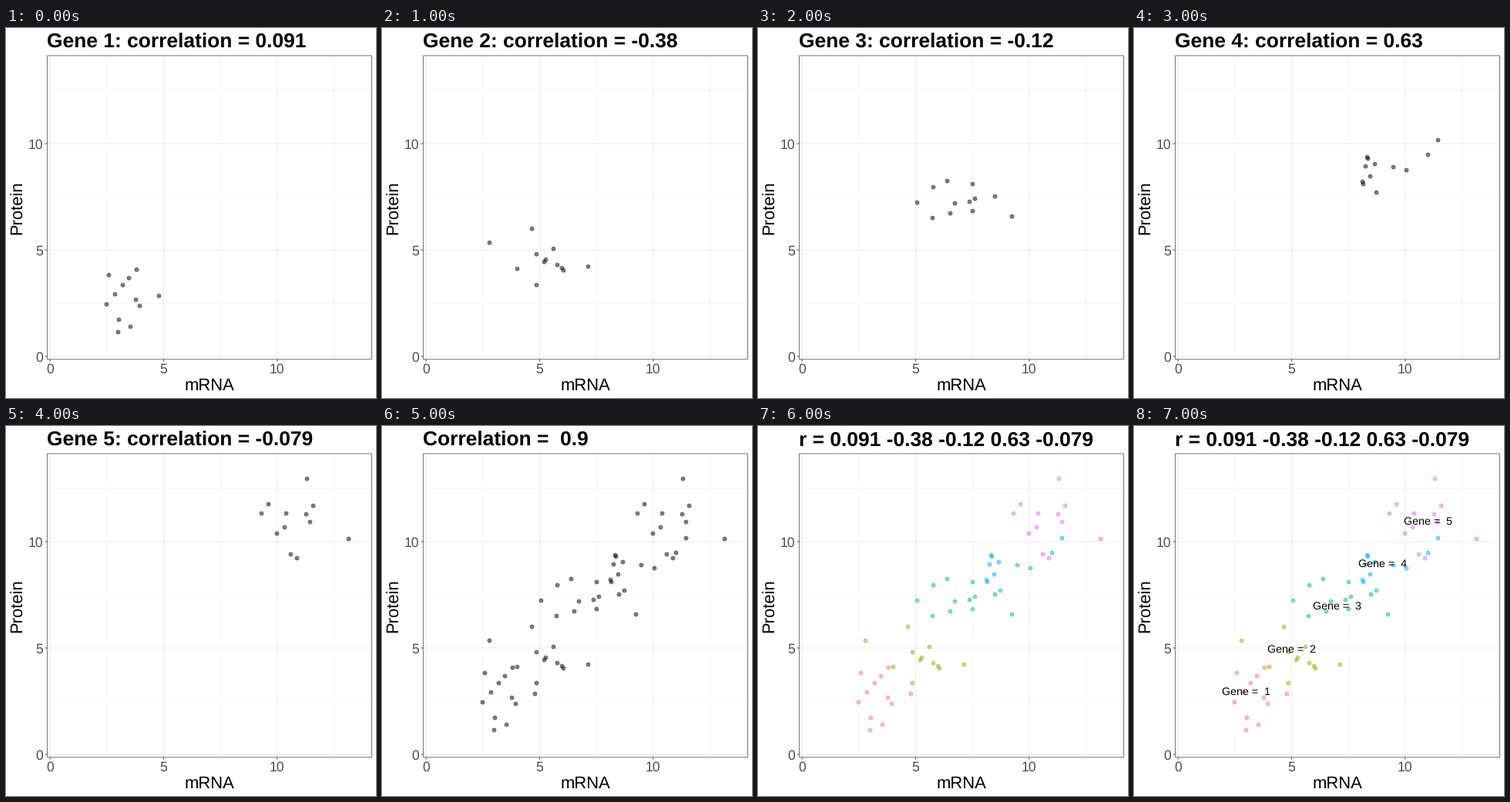
Write a matplotlib script that moves like this. It is 480 px wide and 480 px high and loops after 8000 ms.

```python
import matplotlib.pyplot as plt
import numpy as np
from matplotlib.animation import FuncAnimation

SIZE, DPI = 480, 96
PT = 72 / DPI                      # points per pixel
X0, Y0, SX, SY = 57.2, 426.0, 29.47, 27.6
LEFT, RIGHT, TOP, BOTTOM = 53.5, 474.5, 35.9, 429.8
SAMPLES = 12

plt.rcParams.update({
    "font.family": "Liberation Sans",
    "text.hinting": "none",
})

# Per gene: correlation, mean, standard deviation, colour
GENES = [
    ("0.091", (3.36, 2.72), (0.62, 0.90), "#F8766D"),
    ("-0.38", (5.17, 4.55), (1.05, 0.66), "#A3A500"),
    ("-0.12", (6.98, 7.31), (1.15, 0.56), "#00BF7D"),
    ("0.63", (9.07, 8.88), (1.10, 0.65), "#00B0F6"),
    ("-0.079", (10.81, 10.94), (0.99, 1.00), "#E76BF3"),
]
CORR = [g[0] for g in GENES]

fig = plt.figure(figsize=(SIZE / DPI, SIZE / DPI), dpi=DPI, facecolor="white")
ax = fig.add_axes([0, 0, 1, 1])
ax.set_xlim(0, SIZE)
ax.set_ylim(SIZE, 0)
ax.axis("off")


def to_px(x, y):
    return X0 + x * SX, Y0 - y * SY


def line(xs, ys, color, width, z=1):
    ax.plot(xs, ys, color=color, lw=width * PT, zorder=z, snap=False,
            solid_capstyle="butt", solid_joinstyle="miter")


def label(x, y, s, size, color="black", **kw):
    return ax.text(x, y, s, fontsize=size * PT, color=color, zorder=5,
                   va="baseline", rotation_mode="anchor", **kw)


def draw_panel():
    for v in (2.5, 7.5, 12.5, 0, 5, 10):
        x, y = to_px(v, v)
        major = v % 5 == 0
        width = 1.0 if major else 0.5
        line([x, x], [TOP, BOTTOM], "#EBEBEB", width)
        line([LEFT, RIGHT], [y, y], "#EBEBEB", width)
        if major:
            line([x, x], [BOTTOM, BOTTOM + 2.8], "#333333", 0.9)
            line([LEFT - 2.8, LEFT], [y, y], "#333333", 0.9)
            label(x, 447.4, str(v), 17.6, "#4D4D4D", ha="center")
            label(48.2, y + 6.4, str(v), 17.6, "#4D4D4D", ha="right")
    line([LEFT, RIGHT, RIGHT, LEFT, LEFT], [TOP, TOP, BOTTOM, BOTTOM, TOP],
         "#555555", 0.8, 2)
    label(263.6, 470, "mRNA", 22, ha="center")
    label(21, 233, "Protein", 22, rotation=90, ha="center")


def cloud(rng, r, mean, sd):
    """Normal sample with exactly the given mean, spread and correlation."""
    a, b = rng.standard_normal((2, SAMPLES))
    a = (a - a.mean()) / a.std()
    b = b - b.mean() - a * np.mean(a * b)
    b = r * a + np.sqrt(1 - r * r) * b / b.std()
    return mean[0] + sd[0] * a, mean[1] + sd[1] * b


def make_dots(x, y):
    return ax.scatter(*to_px(x, y), s=(5.1 * PT) ** 2, alpha=0.5,
                      linewidths=0.75 * PT, zorder=3, snap=False)


def make_tag(i):
    x, y = to_px(3 + 2 * i, 3 + 2 * i)
    return label(x, y + 5.5, f"Gene =  {i + 1}", 14.2, ha="center")


draw_panel()
title = label(53.2, 25.5, "", 26.4, weight="bold")
rng = np.random.default_rng(7)
dots = [make_dots(*cloud(rng, float(r), mean, sd))
        for r, mean, sd, _ in GENES]
tags = [make_tag(i) for i in range(len(GENES))]


def update(step):
    if step < 5:
        title.set_text(f"Gene {step + 1}: correlation = {CORR[step]}")
    elif step == 5:
        title.set_text("Correlation =  0.9")
    else:
        title.set_text("r = " + " ".join(CORR))
    for i, (d, tag) in enumerate(zip(dots, tags)):
        d.set_visible(step >= 5 or step == i)
        d.set_color(GENES[i][3] if step >= 6 else "black")
        tag.set_visible(step == 7)
    return [title, *dots, *tags]


anim = FuncAnimation(fig, update, frames=8, interval=1000, repeat=True,
                     repeat_delay=0)
plt.show()
```
